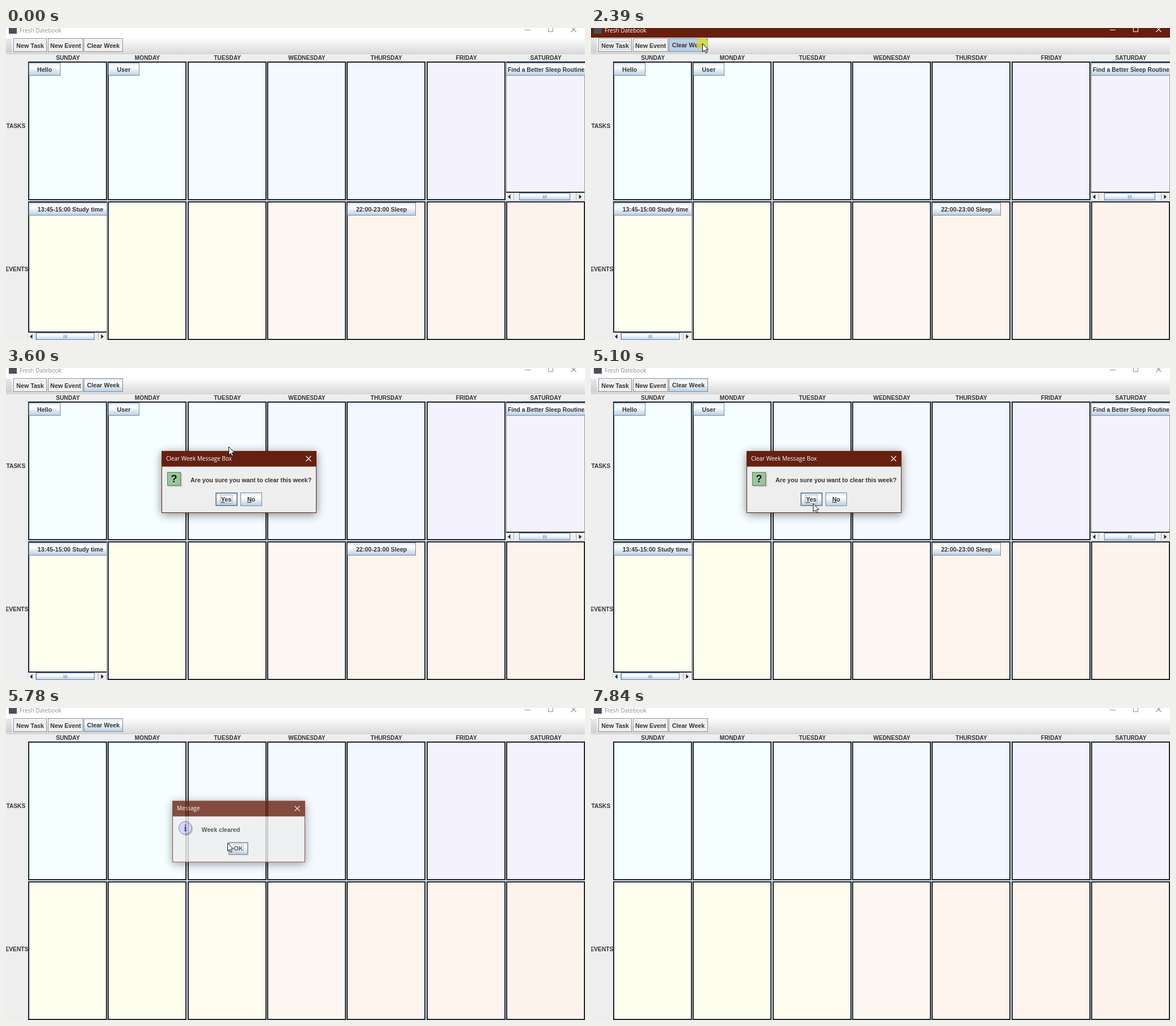
Recreate the animation shown at these times as an HTML page. Size 1020 px wide and 549 px high, loop 7920 ms.

```html
<!DOCTYPE html>
<html lang="en">
<head>
<meta charset="utf-8">
<title>Week planner</title>
<style>
  html, body { margin: 0; width: 100%; height: 100%; overflow: hidden; background: #eee; }
  svg { display: block; width: 1020px; height: 549px; }
  text { font: bold 10.7px "Liberation Sans", Arial, sans-serif; fill: #333; white-space: pre; }
  .mid { text-anchor: middle; }
  .caps { font-size: 10.2px; }
  .title { font: 10px "Open Sans", "Noto Sans", sans-serif; fill: #fff; }
  .dialog { filter: drop-shadow(0 3px 8px #0007); transform-box: fill-box; transform-origin: center; }
</style>
</head>
<body>
<svg id="stage" viewBox="0 0 1020 549"></svg>
<script>
const LOOP = 7920, BROWN = '#67200f', STEEL = '#7a8a99', DARK = '#23282d';
const days = ['SUNDAY', 'MONDAY', 'TUESDAY', 'WEDNESDAY', 'THURSDAY', 'FRIDAY', 'SATURDAY'];
const taskFills = ['#f5ffff', '#f5ffff', '#f5fbff', '#f3f9fe', '#f2f6ff', '#f4f2fe', '#f4f2fe'];
const eventFills = ['#feffee', '#fefeee', '#fefdef', '#fdf7f1', '#fef4ee', '#fef4ee', '#fef2ed'];

const rect = (x, y, w, h, fill, extra = '') =>
  `<rect x="${x}" y="${y}" width="${w}" height="${h}" fill="${fill}" ${extra}/>`;
const frame = (x, y, w, h, fill, stroke, sw = 1) =>
  rect(x + sw / 2, y + sw / 2, w - sw, h - sw, fill, `stroke="${stroke}" stroke-width="${sw}"`);
const text = (x, y, s, cls = '', extra = '') => `<text x="${x}" y="${y}" class="${cls}" ${extra}>${s}</text>`;
const line = (d, stroke, sw = 1) => `<path d="${d}" fill="none" stroke="${stroke}" stroke-width="${sw}"/>`;
const group = (id, body, extra = '') => `<g id="${id}" ${extra}>${body}</g>`;
const button = (x, y, w, h, label, mid = x + w / 2, sw = 1, fill = 'url(#metal)', extra = '') =>
  frame(x, y, w, h, fill, STEEL, sw) + text(mid, y + h / 2 + 4, label, 'mid', extra);
const cross = (x, y, stroke) => line(`M${x - 4.5} ${y - 4.5}l9 9m0 -9l-9 9`, stroke, 1.1);
const underline = s => `<tspan text-decoration="underline">${s[0]}</tspan>${s.slice(1)}`;

const titleBar = (bg, fg) => rect(0, 0, 1020, 17, bg)
  + rect(5, 0, 14, 10, '#4a5057')
  + text(24, 7.5, 'Fresh Datebook', 'title', `style="fill:${fg}"`)
  + line('M914 3.5h10', fg) + line('M955.5 -2v8.5h8v-9', fg) + cross(1000, 2.5, fg);

const toolButton = (x, w, label) => frame(x, 18, w, 24, '#f0f0f0', '#8c8c8c')
  + line(`M${x + 1.5} 40V19.5h${w - 3}`, '#fff') + text(x + w / 2, 35, label, 'mid');

const cells = () => days.map((day, i) => {
  const x = Math.round(39 + 140.3 * i);
  return text(x + 70, 56, day, 'mid caps')
    + rect(x - 1, 58, 141, 491, '#d5dfe9')
    + frame(x, 59, 139, 244, taskFills[i], DARK, 2)
    + frame(x, 305, 139, 244, eventFills[i], DARK, 2);
}).join('');

// Thin cell side that replaces the heavy border while the cell can scroll
const thinSide = (x, lineX, y, h, fill) => rect(x, y, 2, h, fill) + rect(lineX, y, 1, h, '#8b959f');

function scrollBar(x, y, thumbX, thumbW) {
  const m = thumbX + thumbW / 2, c = y + 7;
  return rect(x, y - 2, 138, 2, DARK) + rect(x, y, 138, 13, '#eee')
    + line(`M${x + 13.5} ${y}v13M${x + 123.5} ${y}v13`, '#a9b4bf')
    + frame(thumbX, y, thumbW, 13, 'url(#metal)', '#6382bf')
    + line([-2.5, 0, 2.5].map(d => `M${m + d} ${c - 3}v6`).join(''), '#6382bf')
    + `<path d="M${x + 3} ${c}l4.5 -4v8zM${x + 133} ${c}l-4.5 -4v8z" fill="#222"/>`;
}

const dialog = (id, x, y, w, h, title, body) => group(id,
  rect(x, y, w, h, '#eee') + rect(x, y, w, 27.5, BROWN) + frame(x, y, w, h, 'none', BROWN)
  + text(x + 8, y + 17, title, 'title') + cross(x + w - 14, y + 13.5, '#fff') + body, 'class="dialog"');

const stage = document.getElementById('stage');
stage.innerHTML = `<defs>
  <linearGradient id="metal" x2="0" y2="1"><stop stop-color="#dde8f3"/><stop offset=".3" stop-color="#fff"/>
    <stop offset=".45" stop-color="#f4f8fb"/><stop offset="1" stop-color="#b8cfe5"/></linearGradient>
  <linearGradient id="bar" x2="0" y2="1"><stop stop-color="#fff"/><stop offset="1" stop-color="#dadada"/></linearGradient>
  <pattern id="grip" width="4" height="4" patternUnits="userSpaceOnUse">
    <path d="M0 0h1.3v1.3h-1.3zM2 2h1.3v1.3h-1.3z" fill="#8e9aa6"/></pattern>
</defs>`
  + rect(0, 0, 1020, 549, '#eee')
  + titleBar('#fff', '#8f8f8f') + group('active', titleBar(BROWN, '#fff'))
  + rect(0, 17, 1020, 28, 'url(#bar)') + rect(0, 45, 1020, 1, '#ccc') + rect(0, 19, 10, 24, 'url(#grip)')
  + toolButton(13, 59, 'New Task') + toolButton(74, 62, 'New Event') + toolButton(137, 69, 'Clear Week')
  + group('focus', frame(16, 23, 53, 15, 'none', '#b8c8da'))
  + group('hover', button(137, 18, 69, 24, 'Clear Week'))
  + group('pressed', button(137, 18, 69, 24, 'Clear Week', 171.5, 1, '#b8cfe5'))
  + cells() + text(.5, 176, 'TASKS', 'caps') + text(-1.5, 428, 'EVENTS', 'caps')
  + group('items',
    thinSide(881, 881, 61, 242, taskFills[6]) + thinSide(1018, 1019, 61, 242, taskFills[6])
    + thinSide(176, 177, 307, 242, eventFills[0])
    + button(40, 61, 56, 23, 'Hello') + button(180, 61, 55, 23, 'User')
    + button(881, 61, 142, 23, 'Find a Better Sleep Routine', 951.5, 1, 'url(#metal)', 'style="font-size:10.35px"')
    + button(40, 307, 138, 23, '13:45-15:00 Study time', 113.5)
    + button(601, 307, 121, 23, '22:00-23:00 Sleep')
    + scrollBar(881, 290, 904, 90) + scrollBar(39, 536, 53, 103))
  + dialog('ask', 274, 146, 273, 109, 'Clear Week Message Box',
    rect(286, 185, 24, 24, '#c4c4c4') + frame(284, 183, 24, 24, '#99c79b', '#4f7f55')
    + text(296, 201, '?', 'mid', 'style="font-size:18px;fill:#111"')
    + text(325, 201, 'Are you sure you want to clear this week?')
    + button(369, 219, 39, 24, underline('Yes'), 388, 2) + frame(377, 223, 22, 16, 'none', '#a3b8cc')
    + button(413, 219, 38, 24, underline('No'))
    + group('yesDown', button(369, 219, 39, 24, underline('Yes'), 388, 2, '#b8cfe5')))
  + dialog('done', 292, 163, 236, 109, 'Message',
    '<circle cx="317" cy="213" r="11.5" fill="#bbb"/><circle cx="315" cy="211" r="11.5" fill="#ccccfa" stroke="#666699"/>'
    + text(315, 217, 'i', 'mid', 'style="font:bold 17px Liberation Serif,serif;fill:#333366"')
    + text(344, 218, 'Week cleared')
    + button(392, 236, 35, 23, 'OK', 409.5, 2) + frame(400, 240, 19, 15, 'none', '#a3b8cc')
    + group('okDown', button(392, 236, 35, 23, 'OK', 409.5, 2, '#b8cfe5')))
  + group('cursor', '<circle id="click" r="10.5" fill="#dcdc32" opacity=".8"/>'
    + '<path d="M.5 .5V14.8L3.8 11.9 6 17 8.3 16 6.1 11H10.5Z" fill="#fff" stroke="#111" stroke-linejoin="round"/>');

// Mouse moves: start, end, number of steps, from, control point, to
const moves = [
  [330, 1120, 13, 992, 568, 599, 438, 206, 309],
  [1190, 1790, 10, 206, 309, 245, 150, 196, 27],
  [3210, 3600, 7, 196, 27, 320, 85, 392, 138],
  [3665, 3960, 5, 392, 138, 404, 180, 404, 220],
  [4020, 4180, 3, 404, 220, 397, 232, 392, 239],
  [5100, 5250, 3, 392, 239, 391, 238, 390, 237],
  [6320, 6640, 6, 390, 237, 396, 243, 402, 248],
  [6930, 7270, 6, 402, 248, 470, 370, 570, 560],
];

const within = (t, ...spans) => spans.some(([a, b]) => t >= a && t < b);
// Stepped progress: n equal jumps, the first at a and the last at b
const steps = (t, a, b, n) =>
  t < a ? 0 : Math.min(1, (Math.floor((t - a) / (b - a) * (n - 1) + 1e-6) + 1) / n);
const quad = (a, c, b, p) => (1 - p) ** 2 * a + 2 * p * (1 - p) * c + p * p * b;

function pointer(t) {
  const [a, b, n, x0, y0, cx, cy, x1, y1] = moves.findLast(m => t >= m[0]) || moves[0];
  const p = steps(t, a, b, n);
  return [quad(x0, cx, x1, p), quad(y0, cy, y1, p)].map(Math.round);
}

const el = Object.fromEntries([...stage.querySelectorAll('g[id], #click')].map(e => [e.id, e]));
const show = (name, on) => el[name].style.display = on ? '' : 'none';

function fade(name, level) {
  show(name, level > 0);
  el[name].style.opacity = level;
  el[name].style.transform = level < 1 ? `scale(${.955 + .045 * level})` : '';
}

function draw(t) {
  const active = within(t, [2390, 2520], [5580, 5710], [6925, 7840]);
  show('active', active);
  show('focus', active);
  show('hover', within(t, [1720, 6925]));
  show('pressed', within(t, [2390, 2455]));
  show('items', t < 5645);
  show('yesDown', within(t, [5450, 5515]));
  show('okDown', within(t, [6790, 6857]));
  show('click', within(t, [2390, 2520], [5450, 5580], [6790, 6925]));
  show('cursor', within(t, [330, 7270]));
  fade('ask', steps(t, 2520, 2720, 4) - steps(t, 5580, 5645, 2));
  fade('done', Math.min(1, steps(t, 5712, 5844, 3) * 1.2) - steps(t, 6925, 7060, 3));
  el.cursor.setAttribute('transform', `translate(${pointer(t)})`);
}

const start = performance.now();
(function tick() {
  draw((performance.now() - start) % LOOP);
  requestAnimationFrame(tick);
})();
</script>
</body>
</html>
```
